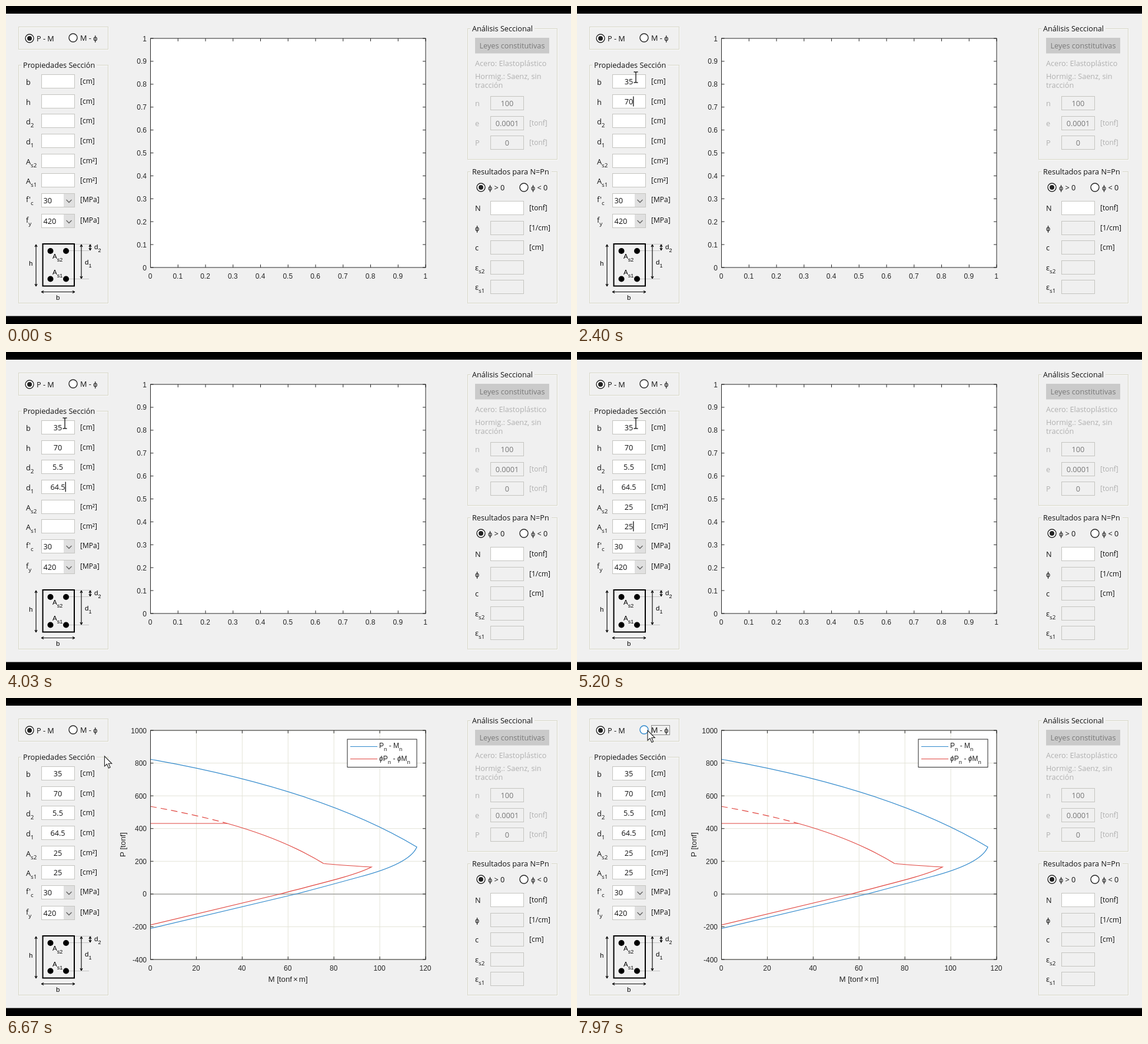
An HTML page for the animation above (8000 ms loop, 960 px wide and 540 px high).

```html
<!DOCTYPE html>
<html lang="es">
<head>
<meta charset="utf-8">
<style>
html, body { margin: 0; height: 100%; overflow: hidden; background: #000; }
svg { display: block; width: 100%; height: 100%; }
text { font: 12.7px "Open Sans", sans-serif; fill: #111; white-space: pre; }
.unit { font-size: 12px; }
.off { fill: #b0b0b0; }
.val { fill: #787878; }
.ax, .ax text { font: 12px "Liberation Sans", Arial, sans-serif; fill: #262626; }
.ax .name { font-size: 13.3px; }
.ax .small { font-size: 11.5px; fill: #000; }
</style>
</head>
<body>
<svg id="stage" viewBox="0 0 960 540"></svg>
<script>
const BG = '#f0f0f0', PAPER = '#fff', INK = '#262626', EDGE = '#c4c4c0', FRAME = '#d6d6c6';
const BLUE = '#2f88cb', RED = '#e0453f';

const rect = (x, y, w, h, fill, stroke = 'none', more = '') =>
  `<rect x="${x}" y="${y}" width="${w}" height="${h}" fill="${fill}" stroke="${stroke}" ${more}/>`;
const path = (d, stroke, w = 1, more = '') =>
  `<path d="${d}" fill="none" stroke="${stroke}" stroke-width="${w}" ${more}/>`;
const text = (x, y, s, cls = '', more = '') => `<text x="${x}" y="${y}" class="${cls}" ${more}>${s}</text>`;
const mid = 'text-anchor="middle"', end = 'text-anchor="end"';

// The word after "_" is set small and low
const sub = (s, size = 9.8, dy = 4.5) => s.replace(/_(\w+)/g,
  (m, low) => `<tspan dy="${dy}" style="font-size:${size}px">${low}</tspan><tspan dy="${-dy}">&#8203;</tspan>`);

function panel(x, y, w, h, title, titleWidth) {
  let s = rect(x + 1.5, y + 1.5, w, h, 'none', '#fafafa') + rect(x + .5, y + .5, w, h, 'none', FRAME);
  if (title) s += rect(x + 5, y - 2, titleWidth + 6, 6, BG) + text(x + 8, y + 4.5, title);
  return s;
}

const field = (x, y, on = true) => rect(x + .5, y - 11.5, 56, 23, on ? PAPER : BG, EDGE);

function radio(x, y, label, on, id = '') {
  return `<circle cx="${x}" cy="${y}" r="7" fill="${PAPER}" stroke="${INK}" stroke-width="1.4" ${id}/>` +
    (on ? `<circle cx="${x}" cy="${y}" r="4" fill="#222"/>` : '') + text(x + 12, y + 5, label);
}

function arrow(x1, y1, x2, y2) {
  const a = Math.atan2(y2 - y1, x2 - x1);
  const head = (x, y, a) => [-.45, .45].map(k =>
    `M${x} ${y}l${(4.5 * Math.cos(a + k)).toFixed(2)} ${(4.5 * Math.sin(a + k)).toFixed(2)}`).join('');
  return path(`M${x1} ${y1}L${x2} ${y2}` + head(x1, y1, a) + head(x2, y2, a + Math.PI), '#111', 1.2);
}

function sectionSketch() {
  let s = path('M102 415.5H141M102 463.5H141M117 404.5H146', '#c4c4c4') +
    rect(62.5, 404, 53.5, 71.5, 'none', '#000', 'stroke-width="2"');
  for (const x of [75.5, 102]) for (const y of [416, 463.5]) s += `<circle cx="${x}" cy="${y}" r="5"/>`;
  s += arrow(51, 405, 51, 476) + arrow(60, 485.5, 117, 485.5) + arrow(128, 405, 128, 463) + arrow(143, 405, 143, 415);
  const labels = [[39, 441, 'h'], [85, 499, 'b'], [134, 439, 'd_1'], [150, 413, 'd_2'], [79, 429, 'A_s2'], [79, 456, 'A_s1']];
  return s + `<g class="ax">${labels.map(([x, y, l]) => text(x, y, sub(l, 9, 4.5), 'small')).join('')}</g>`;
}

// Axes box spans 245..713 by 55..444
function axes(xs, ys, grid, inside = '') {
  let ticks = '', lines = '', labels = '';
  xs.forEach((v, i) => {
    const x = 245.5 + i * 467.5 / (xs.length - 1);
    ticks += `M${x} 444v-5M${x} 55v5`;
    lines += `M${x} 55V444`;
    labels += text(x - .5, 463, v, '', mid);
  });
  ys.forEach((v, i) => {
    const y = 444 - i * 389 / (ys.length - 1);
    ticks += `M245.5 ${y}h5M713 ${y}h-5`;
    lines += `M245.5 ${y}H713`;
    labels += text(239, y + 4.5, v, '', end);
  });
  return `<g class="ax">${rect(245.5, 55, 467.5, 389, PAPER)}${grid ? path(lines, '#e4e4d8') : ''}` +
    inside + path(ticks, INK) + rect(245.5, 55, 467.5, 389, 'none', INK) + labels + '</g>';
}

function curves() {
  const phi = '<tspan font-style="italic">ϕ</tspan>';
  return path('M245 333H713', '#808080') +
    path('M245 104Q535 155 698 253C689 275 650 291 600 304C560 315 525 324.500 492 333L245 391.500', BLUE, 1.2) +
    path('M245 184Q315 196.500 376 213', RED, 1.2, 'stroke-dasharray="11 7"') +
    path('M245 213H376Q472.500 240 539.500 281Q560 283.500 621 287C590 303 520 318 465 333L245 385.500', RED, 1.2) +
    rect(580, 70, 118, 47.5, PAPER, INK) +
    path('M585 82.500H631', BLUE, 1.2) + path('M585 103.500H631', RED, 1.2) +
    text(634, 85, sub('P_n - M_n', 9.6, 5)) +
    text(634, 107, phi + sub('P_n - ', 9.6, 5) + phi + sub('M_n', 9.6, 5)) +
    text(479, 482, 'M [tonf<tspan dx="2">×</tspan><tspan dx="2">m]</tspan>', 'name', mid) +
    text(0, 0, 'P [tonf]', 'name', mid + ' transform="translate(203 249) rotate(-90)"');
}

function leftSide() {
  let s = panel(21, 35, 152, 38) + panel(21, 100, 152, 404, 'Propiedades Sección', 122) +
    radio(40, 55, 'P - M', true) + radio(114, 54, 'M - ϕ', false, 'id="mphi"') +
    rect(126.5, 46.5, 31, 16, 'none', '#222', 'id="focus" stroke-dasharray="1 1"');
  const rows = [['b', 128], ['h', 162], ['d_2', 195], ['d_1', 229], ['A_s2', 263], ['A_s1', 296]];
  rows.forEach(([name, y], i) => {
    s += text(34, y + 6, sub(name)) + field(60, y) + text(126, y + 4, i < 4 ? '[cm]' : '[cm²]', 'unit');
  });
  for (const [name, y, v] of [["f'_c", 330, 30], ['f_y', 365, 420]]) {
    s += text(34, y + 3, sub(name)) + field(60, y) + rect(98, y - 11, 18, 22, '#e0e0e0') +
      path(`M102.500 ${y - 1}l4.500 4.500l4.500 -4.500`, '#606060', 1.3) +
      text(63.5, y + 5, v) + text(126, y + 3, '[MPa]', 'unit');
  }
  return s + sectionSketch();
}

function rightSide() {
  let s = panel(784, 38, 152, 222, 'Análisis Seccional', 103) + panel(784, 281, 152, 223, 'Resultados para N=Pn', 132) +
    rect(797, 54, 126, 26.5, '#cacaca') + text(860, 72, 'Leyes constitutivas', 'val', mid) +
    text(797, 102, 'Acero: Elastoplástico', 'off') + text(797, 124, 'Hormig.: Saenz, sin', 'off') +
    text(797, 139, 'tracción', 'off');
  for (const [name, y, v, unit] of [['n', 165, '100', ''], ['e', 199, '0.0001', '[tonf]'], ['P', 232, '0', '[tonf]']])
    s += text(797, y + 5, name, 'off') + field(823, y, false) + text(851.5, y + 5, v, 'val', mid) +
      text(889, y + 4, unit, 'unit off');
  s += radio(807, 308, 'ϕ &gt; 0', true) + radio(880, 308, 'ϕ &lt; 0', false);
  for (const [name, y, unit] of [['N', 343, '[tonf]'], ['ϕ', 377, '[1/cm]'], ['c', 410, '[cm]'], ['ε_s2', 444, ''], ['ε_s1', 477, '']])
    s += text(797, y + 5, sub(name)) + field(823, y, name === 'N') + text(889, y + 4, unit, 'unit');
  return s;
}

// Each entry: row centre, moment of focus, text, moments of the keystrokes
const entries = [
  [128, 800, '35', [1050, 1300]],
  [162, 1720, '70', [1970, 2200]],
  [195, 2570, '5.5', [2720, 2880, 3040]],
  [229, 3370, '64.5', [3450, 3550, 3650, 3750]],
  [263, 4070, '25', [4220, 4400]],
  [296, 4600, '25', [4830, 5000]]
];
const APPEAR = 30, PLOT = 5400, CLICK = 7870, LOOP = 8000, BLINK = 530;

const tenths = [...Array(11).keys()].map(i => i / 10);
const steps = (from, by, n) => Array.from({ length: n }, (_, i) => from + i * by);
const stage = document.getElementById('stage');
stage.innerHTML = rect(0, 0, 960, 540, '#000') + rect(0, 13, 960, 513.5, BG) + leftSide() + rightSide() +
  `<g id="empty">${axes(tenths, tenths, false)}</g>` +
  `<g id="chart">${axes(steps(0, 20, 7), steps(-400, 200, 8), true, curves())}</g>` +
  entries.map(([y], i) => text(88, y + 5, '', '', `id="v${i}" ${mid}`)).join('') +
  rect(0, 0, 1.2, 17, '#000', 'none', 'id="caret"') +
  `<g id="beam">${path('M-3.500 -9H-1L0 -8L1 -9H3.500M0 -8V8M-3.500 9H-1L0 8L1 9H3.500', '#222', 1.4)}</g>` +
  '<path id="pointer" d="M0 0V17L4 13.400L7 20.200L9.700 19L6.800 12.500H12.300Z" fill="#fff" stroke="#222" stroke-width="1.1"/>';

const $ = id => document.getElementById(id);
const show = (id, on) => $(id).setAttribute('visibility', on ? 'visible' : 'hidden');

const track = [[0, 100, 121], [6000, 100, 121], [6070, 101, 120], [6750, 170, 98],
  [7170, 170, 98], [7700, 120, 55], [LOOP, 120, 55]];

function mouse(t) {
  const i = track.findIndex(p => p[0] > t);
  const [t0, x0, y0] = track[i - 1], [t1, x1, y1] = track[i];
  const k = (t - t0) / (t1 - t0), e = k * k * (3 - 2 * k);
  return [x0 + (x1 - x0) * e, y0 + (y1 - y0) * e];
}

function drawEntries(t) {
  let active = -1, since = 0;
  entries.forEach(([, focus, word, keys], i) => {
    const typed = keys.filter(k => t >= k);
    $('v' + i).textContent = word.slice(0, typed.length);
    if (t >= focus) {
      active = i;
      since = Math.max(focus, ...typed);
    }
  });
  show('caret', active >= 0 && t < CLICK && (t - since) % (2 * BLINK) < BLINK);
  if (active < 0) return;
  const x = 88 + $('v' + active).getComputedTextLength() / 2;
  $('caret').setAttribute('transform', `translate(${x} ${entries[active][0] - 8.5})`);
}

function draw(t) {
  drawEntries(t);
  show('empty', t < PLOT);
  show('chart', t >= PLOT);

  const [x, y] = mouse(t), inField = x < 117 && y > 116;
  show('beam', inField && t >= APPEAR);
  show('pointer', !inField);
  for (const id of ['beam', 'pointer']) $(id).setAttribute('transform', `translate(${x} ${y})`);
  const hover = x > 106 && x < 160 && y > 44 && y < 64;
  $('mphi').setAttribute('stroke', hover ? '#2f88cb' : INK);
  show('focus', t >= CLICK);
}

function tick(now) {
  draw(now % LOOP);
  requestAnimationFrame(tick);
}
draw(0);
requestAnimationFrame(tick);
</script>
</body>
</html>
```
